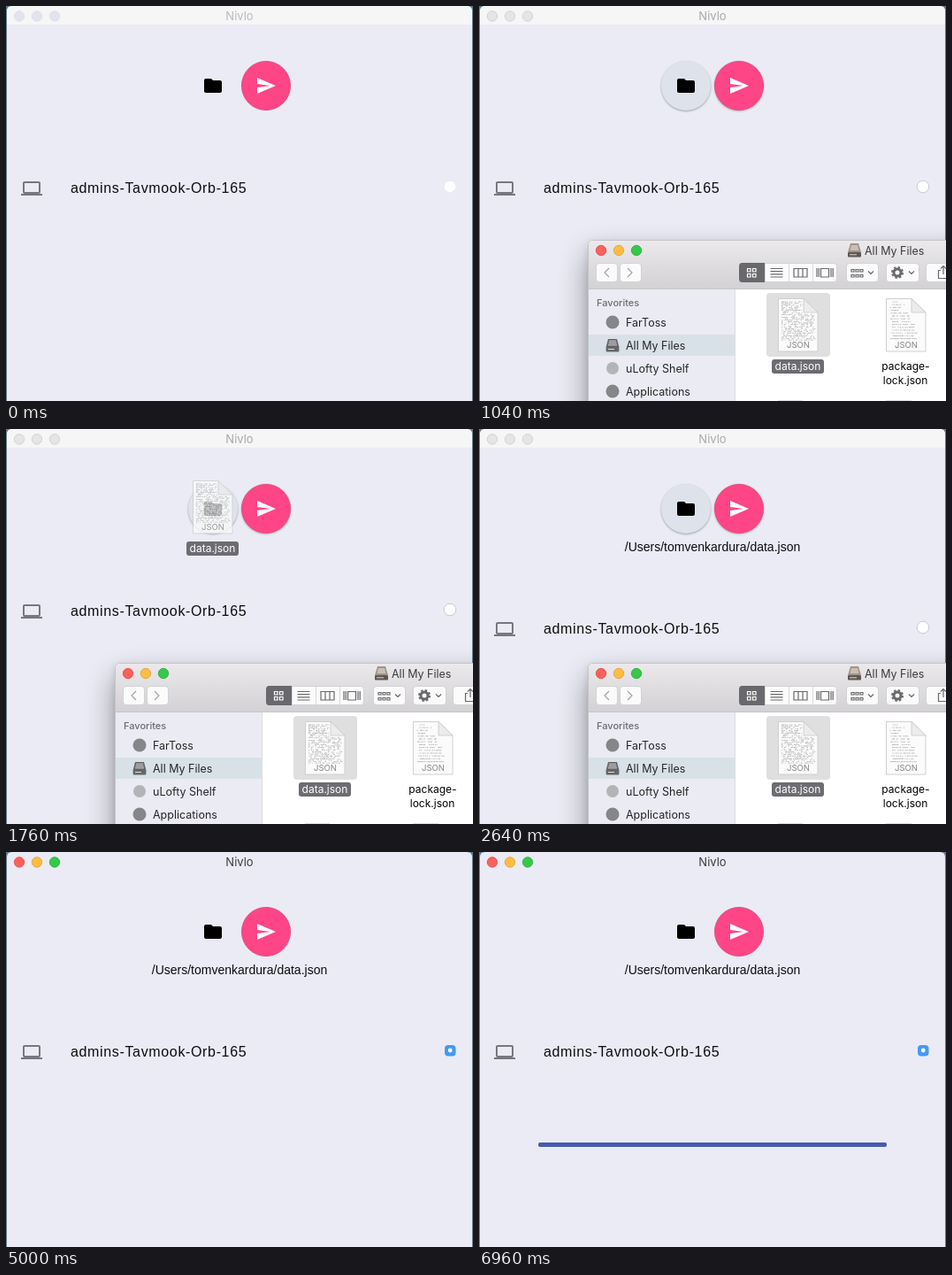
These frames come from a looping animation (528 px wide and 446 px high, 7040 ms). An HTML page:

```html
<!DOCTYPE html>
<html lang="en">
<head>
<meta charset="utf-8">
<title>File transfer demo</title>
<style>
  html, body { margin: 0; width: 100%; height: 100%; overflow: hidden; background: #5d7888; }
  svg { display: block; width: 528px; height: 446px; }
  .ui { font-family: Inter, "Open Sans", sans-serif; font-size: 12.5px; fill: #262628; }
  .web { font-family: "Liberation Sans", Arial, sans-serif; fill: #0c0c10; }
  .mid { text-anchor: middle; }
</style>
</head>
<body>
<svg viewBox="0 0 528 446" xmlns="http://www.w3.org/2000/svg">
  <defs>
    <linearGradient id="chrome" x1="0" y1="0" x2="0" y2="1">
      <stop offset="0" stop-color="#ebe9eb"/><stop offset="1" stop-color="#d3d1d4"/>
    </linearGradient>
    <filter id="soft" x="-30%" y="-30%" width="160%" height="160%"><feGaussianBlur stdDeviation="17"/></filter>
    <filter id="near" x="-30%" y="-30%" width="160%" height="160%"><feGaussianBlur stdDeviation="5"/></filter>
    <filter id="lift" x="-30%" y="-30%" width="160%" height="160%"><feGaussianBlur stdDeviation="1.2"/></filter>
    <clipPath id="stage"><rect width="528" height="446"/></clipPath>
    <g id="page">
      <path d="M.5 .5H29L45 16V60H.5Z" fill="#fbfbfb" stroke="#cfcfcf"/>
      <path d="M29 .5V16H45Z" fill="#ececec" stroke="#c9c9c9" stroke-width=".8"/>
    </g>
    <g id="dataFile">
      <use href="#page"/>
      <path id="dense" fill="none" stroke="#a2a2a2" stroke-width=".8"/>
      <rect x="10" y="48" width="26" height="10" fill="#fbfbfb"/>
      <text class="ui mid" x="23" y="56" style="font-size:9.5px;fill:#858585">JSON</text>
    </g>
    <g id="lockFile">
      <use href="#page"/>
      <path id="sparse" fill="none" stroke="#a4a4a4" stroke-width=".8"/>
      <rect x="10" y="48" width="26" height="10" fill="#fbfbfb"/>
      <text class="ui mid" x="23" y="56" style="font-size:9.5px;fill:#858585">JSON</text>
    </g>
    <g id="drive">
      <path d="M3 0H12L15 10H0Z" fill="#a0948a"/>
      <path d="M4 2H11L12.5 8H2.5Z" fill="#cbbfb4"/>
      <rect y="10" width="15" height="5.5" rx="1" fill="#5d5754"/>
      <path d="M2 12.8H10" stroke="#d8d4d0"/>
    </g>
    <g id="tray">
      <path d="M3 .6H13L15.4 9.5V14Q15.4 15 14.4 15H1.6Q.6 15 .6 14V9.5Z" fill="#66666a"/>
      <path d="M4 2.8H12M3.5 5H12.5M3 7.2H13M3 12H10" fill="none" stroke="#dcdcde"/>
    </g>
  </defs>

  <g clip-path="url(#stage)">
    <rect width="528" height="446" fill="#5d7888"/>
    <path d="M1 446V6Q1 0 7 0H521Q527 0 527 6V446Z" fill="#ebebf5"/>
    <path id="bar" d="M1 21V6Q1 0 7 0H521Q527 0 527 6V21Z" fill="#f6f6f6"/>
    <g id="lights"></g>
    <text id="title" class="ui mid" x="264" y="16" style="font-size:13px">Nivlo</text>

    <g id="round">
      <circle cx="234" cy="91" r="28" opacity=".32" filter="url(#lift)"/>
      <circle id="disc" cx="234" cy="90" r="28"/>
    </g>
    <path transform="translate(222 78)" d="M10 4H4C2.9 4 2 4.9 2 6V18C2 19.1 2.9 20 4 20H20C21.1 20 22 19.1 22 18V8C22 6.9 21.1 6 20 6H12Z"/>
    <circle id="sendShade" cx="294" cy="91" r="28" opacity=".25" filter="url(#lift)"/>
    <circle cx="294" cy="90" r="27.6" fill="#fe4586" stroke="#d9527f" stroke-width=".9"/>
    <path transform="translate(282 78)" d="M2 21L23 12L2 3V10L17 12L2 14Z" fill="#fff"/>
    <text id="path" class="web mid" x="264" y="138" style="font-size:14px">/Users/tomvenkardura/data.json</text>

    <g id="row">
      <path transform="translate(17 194)" fill="#77777f" fill-rule="evenodd"
        d="M20 18C21.1 18 22 17.1 22 16V6C22 4.9 21.1 4 20 4H4C2.9 4 2 4.9 2 6V16C2 17.1 2.9 18 4 18H0V20H24V18ZM4 6H20V16H4Z"/>
      <text class="web" x="73" y="211" style="font-size:16px;letter-spacing:.65px">admins-Tavmook-Orb-165</text>
      <circle id="radio" cx="502" cy="204" fill="#fff"/>
      <g id="picked">
        <rect x="496" y="198" width="12.5" height="12.5" rx="4" fill="#439af1"/>
        <circle cx="502.2" cy="204" r="2.4" fill="#fff"/>
      </g>
    </g>
    <rect id="progress" x="67" y="328" height="5" rx="2" fill="#485bae"/>

    <g id="finder">
      <rect id="farShade" x="124" y="281" width="450" height="230" opacity=".42" filter="url(#soft)"/>
      <rect id="nearShade" x="124" y="268" width="450" height="230" opacity=".25" filter="url(#near)"/>
      <rect x="123.5" y="264.5" width="440" height="220" rx="5" fill="#fff" stroke="#c4c4c8"/>
      <path id="chromeBar" d="M124 319V270Q124 265 129 265H528V319Z"/>
      <rect id="side" x="124" y="320" width="165" height="126"/>
      <path d="M124 319.5H528" stroke="#c6c6c8"/>
      <path d="M289.5 320V446" stroke="#dcdcde"/>
      <g id="finderLights"></g>
      <use href="#drive" x="417" y="268"/>
      <text id="finderTitle" class="ui" x="436" y="281">All My Files</text>
      <g id="tools"></g>

      <text class="ui" x="133" y="339" style="font-size:11px;font-weight:500;fill:#6c6c70">Favorites</text>
      <rect id="choice" x="124" y="371" width="165" height="24"/>
      <circle cx="151" cy="357" r="7.5" fill="#85858a"/>
      <use href="#tray" x="143" y="375.5"/>
      <circle cx="151" cy="409" r="7" fill="#b4b4b8"/>
      <circle cx="151" cy="435" r="7.5" fill="#85858a"/>
      <g id="places"></g>

      <rect x="325" y="324" width="72" height="72" rx="4" fill="#dfdfdf"/>
      <use href="#dataFile" x="338" y="330"/>
      <rect id="tag" x="331" y="399" width="59" height="16" rx="3"/>
      <text id="tagText" class="ui mid" x="360.5" y="411" style="font-size:12px">data.json</text>
      <use href="#lockFile" x="460" y="330"/>
      <text class="ui mid" x="482.5" y="411" style="font-size:12px;fill:#000">package-</text>
      <text class="ui mid" x="482" y="427" style="font-size:12px;fill:#000">lock.json</text>
      <path d="M338 445.5H366M460 445.5H489" stroke="#ddd"/>
    </g>

    <g id="ghost">
      <use href="#dataFile" x="338" y="330" opacity=".78"/>
      <rect x="331" y="399" width="59" height="16" rx="3" fill="#6c6c72"/>
      <text class="ui mid" x="360.5" y="411" style="font-size:12px;fill:#fff">data.json</text>
    </g>
  </g>
</svg>
<script>
const LOOP = 7040, STEP = 40;
const $ = id => document.getElementById(id);
const set = (id, attrs) => { for (const k in attrs) $(id).setAttribute(k, attrs[k]); };
const show = (id, on) => set(id, { visibility: on ? "visible" : "hidden" });
const clamp = v => Math.max(0, Math.min(1, v));
const span = (t, a, b) => clamp((t - a) / (b - a));
const smooth = p => p * p * (3 - 2 * p);

function make(parent, tag, attrs, text) {
  const el = document.createElementNS("http://www.w3.org/2000/svg", tag);
  for (const k in attrs) el.setAttribute(k, attrs[k]);
  if (text) el.textContent = text;
  $(parent).append(el);
  return el;
}

// Window buttons
const COLORS = [["#fc615c", "#df4643"], ["#fdbd41", "#dd9e35"], ["#35c94b", "#27a835"]];
const addLights = (group, x, y) =>
  COLORS.map((_, i) => make(group, "circle", { cx: x + 20 * i, cy: y, r: 5.7, "stroke-width": .8 }));
const appLights = addLights("lights", 15, 11.5);
const finderLights = addLights("finderLights", 138, 276);
const FILLS = { off: ["#e5e5e7", "#cbcbcf"], pale: ["#e3e3ee", "#dcdce8"] };
function paintLights(list, mode) {
  list.forEach((el, i) => {
    const [fill, stroke] = FILLS[mode] || COLORS[i];
    el.setAttribute("fill", fill);
    el.setAttribute("stroke", stroke);
  });
}

// Toolbar
const box = (x, w) => make("tools", "rect",
  { x: x + .5, y: 290.5, width: w, height: 21, rx: 3.5, fill: "#fbfbfb", stroke: "#d2d2d5" });
const mark = (d, attrs) => make("tools", "path",
  { d, fill: "none", stroke: "#6a6a6e", "stroke-width": 1.2, ...attrs });
box(132, 24); box(159, 24); box(294, 110); box(415, 36); box(460, 37); box(505, 40);
const viewCell = make("tools", "path", { d: "M323 290V312H297.5Q294 312 294 308V294Q294 290 297.5 290Z" });
mark("M147 296L142 301L147 306M168 296L173 301L168 306", { stroke: "#a2a2a6" });
const viewDots = mark("M303.5 296.5h3.5v3.5h-3.5zM309.5 296.5h3.5v3.5h-3.5zM303.5 302.5h3.5v3.5h-3.5zM309.5 302.5h3.5v3.5h-3.5z");
mark("M323.5 291V311M350.5 291V311M377.5 291V311", { stroke: "#d8d8da", "stroke-width": 1 });
mark("M329.5 296.5h14M329.5 299.7h14M329.5 302.9h14M329.5 306h14");
mark("M356 296.5h15v9.5h-15zM361 296.5v9.5M366 296.5v9.5");
mark("M386.5 296.5h9v9.5h-9zM382 296v10M384.2 296v10M398 296v10M400.2 296v10");
for (let i = 0; i < 6; i++)
  mark(`M${421 + 5 * (i % 3)} ${i < 3 ? 297.5 : 303.5}h3v2.5h-3z`);
mark("M440 299.5L443 302.5L446 299.5M486 299.5L489 302.5L492 299.5");
make("tools", "circle", { cx: 473, cy: 301, r: 4, fill: "none", stroke: "#6a6a6e", "stroke-width": 3 });
make("tools", "circle", { cx: 473, cy: 301, r: 6, fill: "none", stroke: "#6a6a6e", "stroke-width": 2, "stroke-dasharray": "2.4 2.31" });
mark("M522 298.5H519.5V307.5H528M525 303V294M522 296.5L525 293.5L528 296.5");

// Sidebar labels
["FarToss", "All My Files", "uLofty Shelf", "Applications"].forEach((name, i) =>
  make("places", "text", { x: 166, y: 361.5 + 26 * i, class: "ui" }, name));

// Tiny text on the document icons
function scribble(gap, fill, indent) {
  let seed = 7, d = "";
  const rnd = () => (seed = seed * 16807 % 2147483647) / 2147483647;
  for (let y = 4; y < 48; y += gap) {
    const end = (y < 18 ? 27 : 41) * (indent ? .45 + .5 * rnd() : 1);
    for (let x = 4 + (indent ? 4 * rnd() : 0); x < end; x += 1.2 + 1.2 * rnd()) {
      if (rnd() < fill) d += `M${x.toFixed(1)} ${y}h${(.8 + rnd()).toFixed(1)}`;
    }
  }
  return d;
}
set("dense", { d: scribble(1.6, .62, false) });
set("sparse", { d: scribble(3.2, .9, true) });

function drawApp(t) {
  const mode = t < 80 || (t >= 3360 && t < 3640) ? "pale" : t >= 480 && t < 3360 ? "off" : "on";
  const behind = mode === "off", dropped = t >= 1800;
  paintLights(appLights, mode);
  show("bar", mode !== "on");
  set("title", { style: `font-size:13px;fill:${{ on: "#3b3b3f", off: "#a9a9ad", pale: "#b9b9c0" }[mode]}` });
  show("round", behind);
  set("disc", { fill: t < 640 ? "#ebebf5" : "#dee3eb" });
  show("sendShade", behind && t >= 640);
  show("path", dropped);
  set("row", { transform: `translate(0 ${dropped ? 20 : 0})` });
  set("radio", behind ? { r: 6.8, stroke: "#c3c3ca", "stroke-width": .9 } : { r: 6.2, stroke: "none" });
  set("picked", { opacity: span(t, 4080, 4240) });
  set("progress", { width: 394 * smooth(span(t, 5400, 6040)) });
}

function drawFinder(t) {
  const open = t >= 480 && t < 3360, key = t >= 680;
  show("finder", open);
  if (!open) return;
  paintLights(finderLights, key ? "on" : "off");
  set("farShade", { opacity: key ? .42 : 0 });
  set("nearShade", { opacity: key ? .12 : .25 });
  set("chromeBar", { fill: key ? "url(#chrome)" : "#f6f6f6" });
  set("side", { fill: key ? "#ebecf3" : "#f4f4f5" });
  set("choice", { fill: key ? "#d9e1e8" : "#d0d0d0" });
  set("finderTitle", { style: `fill:${key ? "#3b3b3f" : "#8e8e92"}` });
  set("tag", { fill: key ? "#6c6c72" : "#d9d9d9" });
  set("tagText", { style: `font-size:12px;fill:${key ? "#fff" : "#444"}` });
  set("tools", { opacity: key ? 1 : .75 });
  viewCell.setAttribute("fill", key ? "#69696d" : "#dedeea");
  viewDots.setAttribute("stroke", key ? "#fff" : "#6a6a6e");
}

function drawDrag(t) {
  show("ghost", t > 1200 && t < 1800);
  const p = smooth(span(t, 1200, 1760)), a = 2 * p * (1 - p), b = p * p;
  set("ghost", { transform: `translate(${-126.5 * a - 127 * b} ${-138.5 * a - 272 * b})` });
}

const start = performance.now();
function frame() {
  const now = (performance.now() - start) % LOOP;
  const t = now - now % STEP;
  drawApp(t);
  drawFinder(t);
  drawDrag(t);
  requestAnimationFrame(frame);
}
frame();
</script>
</body>
</html>
```
